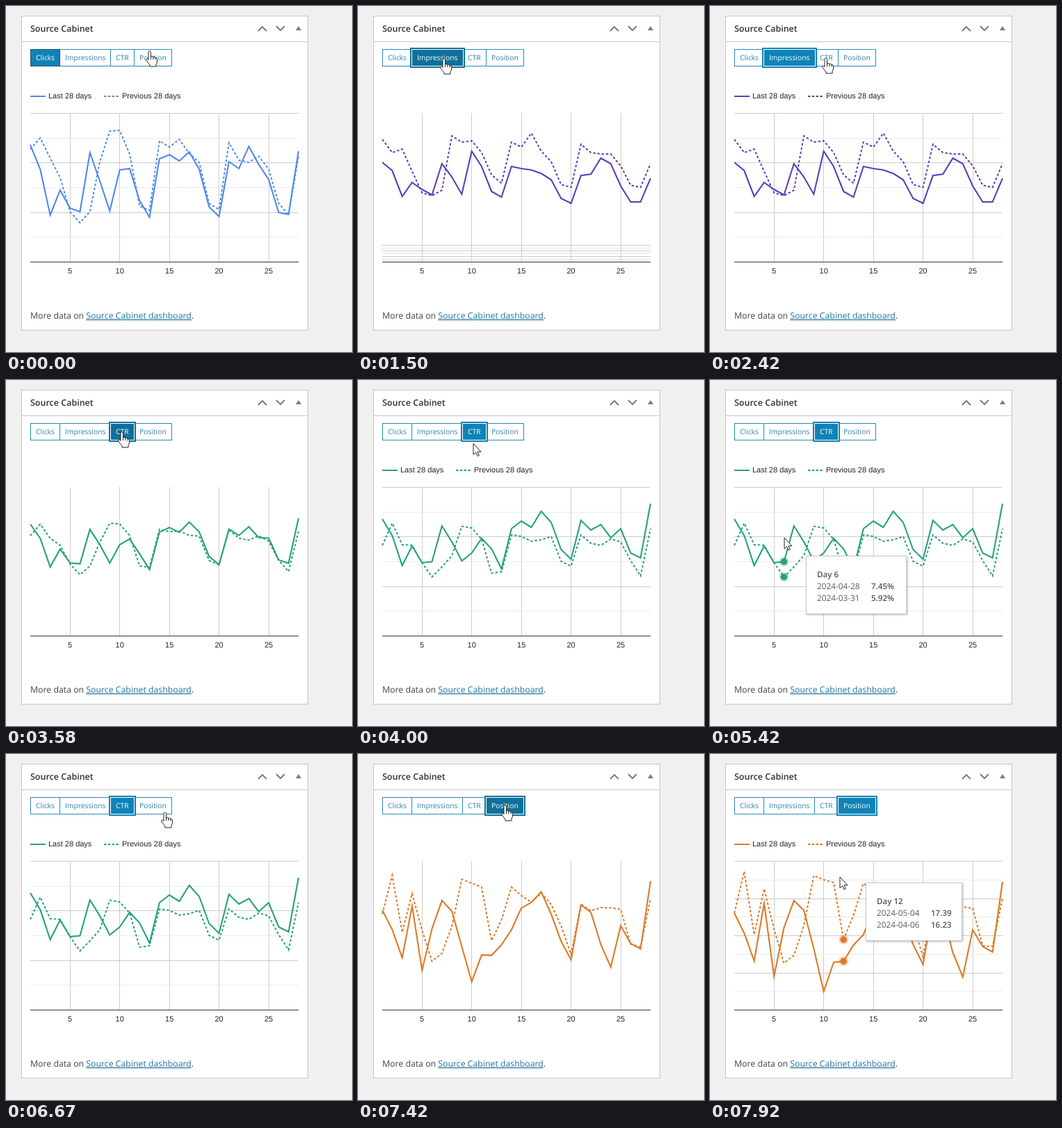
These frames come from a looping animation (498x498 px, 8000 ms). An HTML page with a canvas:

```html
<!DOCTYPE html>
<html lang="en">
<head>
<meta charset="utf-8">
<title>Dashboard widget</title>
<style>
html, body { margin: 0; width: 100%; height: 100%; overflow: hidden; background: #f0f0f1; }
canvas, svg { position: absolute; left: 0; top: 0; width: 498px; height: 498px; }
text { font-family: "Open Sans", "Noto Sans", sans-serif; text-rendering: geometricPrecision; white-space: pre; }
.title { font-size: 12.5px; font-weight: 600; fill: #2c3338; }
.tab { font-size: 10.3px; fill: #2484b0; }
.tab.on { fill: #fff; }
.chart { font-family: "Liberation Sans", Arial, sans-serif; font-size: 11px; fill: #222; }
.mid { text-anchor: middle; }
.body { font-size: 12.3px; fill: #3c434a; }
.link { fill: #2271a6; text-decoration: underline; }
.tip { font-size: 11.8px; fill: #5a5a5a; }
.bold { font-size: 11.6px; font-weight: 600; fill: #555; }
.cursor { fill: #fff; stroke: #222; stroke-width: 1; stroke-linejoin: round; }
</style>
</head>
<body>
<canvas id="stage"></canvas>
<svg viewBox="0 0 498 498">
  <text class="title" x="35" y="37">Source Cabinet</text>
  <g id="tabs"></g>
  <g id="legend">
    <text class="chart" x="61" y="133">Last 28 days</text>
    <text class="chart" x="167" y="133">Previous 28 days</text>
  </g>
  <g id="axis"></g>
  <text class="body" x="35" y="450">More data on <tspan class="link">Source Cabinet dashboard</tspan>.</text>
  <g id="tip">
    <text class="bold" x="16" y="31"></text>
    <text class="tip" x="16" y="47.5"></text>
    <text class="bold" x="94" y="47.5"></text>
    <text class="tip" x="16" y="64.5"></text>
    <text class="bold" x="94" y="64.5"></text>
  </g>
  <g class="cursor">
    <path id="hand" d="M-2 1.5Q-2 0-.3 0Q1.5 0 1.5 1.5V8Q3 6.8 4.8 8V8.8Q6.5 7.6 8 9V9.8Q10.5 9 10.5 11.5V15Q10.5 17 9 19V22H0V20Q-1.5 18-5 13.5Q-6 11.5-4.5 11Q-3.5 10.6-2 12.5ZM1.5 8V12M4.8 8.8V12M8 9.8V12.5"/>
    <path id="arrow" d="M0 0V16L3.6 12.6L6 18L8.3 17L6 11.8H11Z"/>
  </g>
</svg>
<script>
const LOOP = 8000, STEP = 1000 / 12;
const LEFT = 35, RIGHT = 421, TOP = 154, BASE = 368;
const BLUE = '#0f83b7', DARK = '#0f709b';

// Heights of the two lines of each metric, one per day
const clicksNow = [200,235,301,265,291,296,211,252,295,236,234,280,304,220,214,223,210,235,289,303,224,234,202,228,250,297,300,209];
const clicksOld = [206,190,219,247,296,312,296,224,180,179,213,288,294,194,203,192,212,225,284,293,197,222,225,216,235,284,301,216];
const viewsNow = [225,237,274,254,264,272,227,246,271,209,231,267,275,231,234,236,241,250,277,284,244,242,219,227,259,282,282,248];
const viewsOld = [192,211,206,238,269,273,265,187,196,194,211,243,255,196,203,183,209,224,257,261,199,211,213,213,230,258,261,227];
const ctrNow = [200,224,267,239,263,261.47,210,233,260.46,249,228,243,272,214,203,212,189,205,244,258,202,216,208,227,214,249,256,178];
const ctrOld = [238,206,237,238,263,283.34,269,253,210.56,213,229,278,276,223,225,232,230,225,261,268,223,235,238,229,233,260,282,214];
const rankNow = [229,258,298,215,320,250,211,225,280,342,300,298.18,275,260,225,214,200,235,274,303,220,230,286,321,253,277,285,184];
const rankOld = [229,169,260,194,252,301,290,247,175,181,185,267.15,232,186,200,210,195,215,245,292,215,224,218,220,222,276,277,208];

const percent = y => ((BASE - y) / 14.3).toFixed(2) + '%';
const rank = y => (12 + (y - TOP) / 26.75).toFixed(2);

// press: tab turns active, from: lines start moving, move: their duration, done: grid and legend return
const metrics = [
  { name: 'Clicks', x: 35, w: 43, tx: 43, color: '#5089ec', now: clicksNow, old: clicksOld, rows: 6, press: 0, from: 0, move: 0, done: 0 },
  { name: 'Impressions', x: 77, w: 75, tx: 85, color: '#5a3fb9', now: viewsNow, old: viewsOld, rows: 6, press: 1000, from: 1500, move: 0, done: 1660 },
  { name: 'CTR', x: 150, w: 35, tx: 158, color: '#27a17c', now: ctrNow, old: ctrOld, rows: 6, format: percent, press: 3330, from: 3330, move: 560, done: 3890 },
  { name: 'Position', x: 184, w: 55, tx: 192, color: '#dc7a26', now: rankNow, old: rankOld, rows: 8, format: rank, press: 7160, from: 7160, move: 420, done: 7580 }
];

// Pointer stops: time, x, y, drop from pointer to tooltip
const stops = [
  [0, 207, 65, 0], [20, 207, 65, 0], [260, 170, 80, 0], [500, 124, 76, 0],
  [1800, 124, 76, 0], [2120, 146, 84, 0], [2416, 167, 75, 0],
  [3900, 167, 75, 10], [4100, 165, 108, 10], [4416, 154, 220, 19],
  [4850, 154, 220, 19], [5416, 107, 227, 26],
  [5500, 107, 227, 26], [5833, 80, 229, 27],
  [6260, 80, 229, 27], [6500, 170, 140, 20], [6666, 229, 84, 0], [6916, 212, 74, 0],
  [7500, 212, 74, 8], [7700, 204, 112, 8], [7916, 187, 177, 8]
];

const $ = id => document.getElementById(id);
const canvas = $('stage'), ctx = canvas.getContext('2d');
const ratio = window.devicePixelRatio || 1;
canvas.width = canvas.height = 498 * ratio;
ctx.scale(ratio, ratio);

function addText(parent, cls, x, y, str) {
  const el = document.createElementNS('http://www.w3.org/2000/svg', 'text');
  el.setAttribute('class', cls);
  el.setAttribute('x', x);
  el.setAttribute('y', y);
  el.textContent = str;
  parent.appendChild(el);
  return el;
}

const dayX = day => LEFT + (day - 1) * (RIGHT - LEFT) / 27;
for (const m of metrics) m.label = addText($('tabs'), 'tab', m.tx, 78, m.name);
for (let d = 5; d <= 25; d += 5) addText($('axis'), 'chart mid', dayX(d), 385, d);

const mix = (a, b, p) => a + (b - a) * p;
const easeOut = p => 1 - (1 - p) ** 2;
const smooth = p => p * p * (3 - 2 * p);

function pointerAt(t) {
  let i = 0;
  while (i < stops.length - 2 && t >= stops[i + 1][0]) i++;
  const a = stops[i], b = stops[i + 1];
  const p = smooth(Math.min(1, (t - a[0]) / (b[0] - a[0])));
  const [x, y, drop] = [1, 2, 3].map(k => mix(a[k], b[k], p));
  return { x, y, drop };
}

function line(points, color, width = 1, dash = []) {
  ctx.beginPath();
  points.forEach(([x, y]) => ctx.lineTo(x, y));
  ctx.strokeStyle = color;
  ctx.lineWidth = width;
  ctx.setLineDash(dash);
  ctx.stroke();
  ctx.setLineDash([]);
}

function box(x, y, w, h, fill, stroke) {
  ctx.fillStyle = fill;
  ctx.fillRect(x, y, w, h);
  if (!stroke) return;
  ctx.strokeStyle = stroke;
  ctx.lineWidth = 1;
  ctx.strokeRect(x + .5, y + .5, w - 1, h - 1);
}

const level = (y, color) => line([[LEFT, Math.round(y) + .5], [RIGHT, Math.round(y) + .5]], color);

function drawPanel() {
  box(0, 0, 498, 498, '#f0f0f1');
  box(22, 14, 413, 453, '#fff', '#c6c7ca');
  line([[22, 51.5], [434, 51.5]], '#c6c7ca');
  line([[363, 36], [369, 30], [375, 36]], '#787c82', 2);
  line([[389, 29], [395, 35], [401, 29]], '#787c82', 2);
  ctx.fillStyle = '#787c82';
  ctx.beginPath();
  ctx.moveTo(417, 35);
  ctx.lineTo(421, 29);
  ctx.lineTo(425, 35);
  ctx.fill();
}

function drawTabs(active, hover) {
  for (const m of metrics) {
    box(m.x, 62, m.w, 25, '#fff', '#2a8ab2');
    m.label.classList.toggle('on', m === active);
  }
  const { x, w } = active;
  const fill = active === hover ? DARK : BLUE;
  if (active === metrics[0]) {
    box(x, 62, w, 25, fill, '#1b5873');
  } else {
    box(x - 2, 60, w + 4, 29, fill);
    box(x, 62, w, 25, '#fff');
    box(x + 1, 63, w - 2, 23, fill);
  }
}

function drawGrid(m, settled) {
  for (let d = 5; d <= 25; d += 5) {
    const x = Math.floor(dayX(d)) + .5;
    line([[x, TOP], [x, BASE]], '#cccccc');
  }
  if (settled) {
    for (let i = 1; i < m.rows; i += 2) level(mix(TOP, BASE, i / m.rows), '#ebebeb');
    for (let i = 0; i < m.rows; i += 2) level(mix(TOP, BASE, i / m.rows), '#cccccc');
  } else if (m === metrics[1]) {
    // the former rows, squeezed by the larger scale
    for (let i = 0; i < 6; i++) level(344 + i * 4, i % 2 ? '#e4e4e4' : '#cccccc');
  }
  level(BASE, '#333');
}

function drawLegend(color) {
  line([[35, 130], [57, 130]], color, 2);
  line([[141, 130], [162, 130]], color, 2, [3.5, 2.3]);
}

function dot(x, y, color) {
  ctx.fillStyle = color;
  for (const [r, alpha] of [[7, .3], [4.7, 1]]) {
    ctx.globalAlpha = alpha;
    ctx.beginPath();
    ctx.arc(x, y, r, 0, 7);
    ctx.fill();
  }
  ctx.globalAlpha = 1;
}

const dateOf = (month, day) => new Date(Date.UTC(2024, month, day)).toISOString().slice(0, 10);

function drawTip(m, pointer) {
  const day = Math.max(1, Math.min(28, Math.round((pointer.x - LEFT) / 14.296) + 1));
  const x = dayX(day), now = m.now[day - 1], old = m.old[day - 1];
  dot(x, old, m.color);
  dot(x, now, m.color);
  const bx = Math.round(x + 31.6), by = Math.round(pointer.y + pointer.drop);
  ctx.shadowColor = 'rgba(0,0,0,.3)';
  ctx.shadowBlur = 3 * ratio;
  ctx.shadowOffsetX = ctx.shadowOffsetY = ratio;
  box(bx, by, m.format === percent ? 145 : 139, 84, '#fff');
  ctx.shadowColor = 'transparent';
  box(bx, by, m.format === percent ? 145 : 139, 84, '#fff', '#cccccc');
  const lines = ['Day ' + day, dateOf(3, 22 + day), m.format(now), dateOf(2, 25 + day), m.format(old)];
  lines.forEach((s, i) => { $('tip').children[i].textContent = s; });
  $('tip').setAttribute('transform', `translate(${bx} ${by})`);
}

const show = (id, on) => { $(id).style.display = on ? '' : 'none'; };

function render(t) {
  const pointer = pointerAt(t);
  const last = key => metrics.filter(m => t >= m[key]).pop();
  const active = last('press'), m = last('from');
  const settled = t >= m.done;
  const onTabs = pointer.y > 62 && pointer.y < 87;
  const hover = onTabs && metrics.filter(k => pointer.x >= k.x).pop();

  const prior = metrics[Math.max(0, metrics.indexOf(m) - 1)];
  const p = m.move ? easeOut(Math.min(1, (t - m.from) / m.move)) : 1;
  const curve = key => m[key].map((y, i) => [dayX(i + 1), mix(prior[key][i], y, p)]);

  drawPanel();
  drawTabs(active, hover);
  drawGrid(m, settled);
  line(curve('old'), m.color, 2, [3.4, 2.8]);
  line(curve('now'), m.color, 2.1);
  if (settled) drawLegend(m.color);
  const tip = settled && m.format && pointer.y > TOP;
  if (tip) drawTip(m, pointer);

  show('legend', settled);
  show('tip', tip);
  show('hand', onTabs);
  show('arrow', !onTabs);
  document.querySelector('.cursor').setAttribute('transform',
    `translate(${pointer.x.toFixed(1)} ${pointer.y.toFixed(1)})`);
}

const start = performance.now();
function frame() {
  const t = (performance.now() - start) % LOOP;
  render(Math.floor((t + 5) / STEP) * STEP % LOOP);
  requestAnimationFrame(frame);
}
frame();
</script>
</body>
</html>
```
